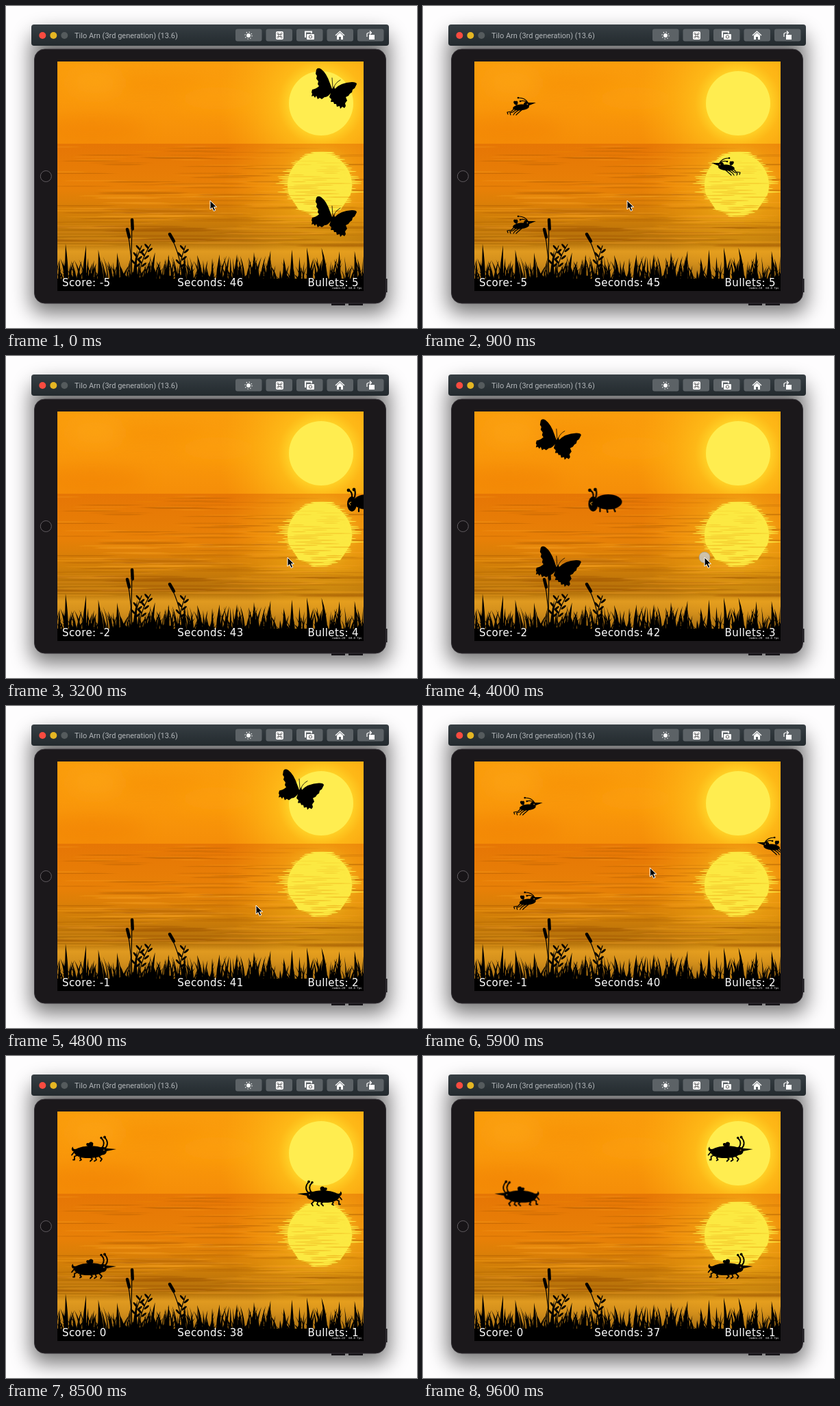
An HTML page for the animation above (9700 ms loop, 600 by 470 pixels).

```html
<!DOCTYPE html>
<html lang="en">
<head>
<meta charset="utf-8">
<title>Sunset shooter</title>
<style>
  html, body { margin: 0; width: 100%; height: 100%; overflow: hidden; background: #fefdfe; }
  svg { display: block; width: 600px; height: 470px; }
  .title { font: 11px Roboto, sans-serif; fill: #b3b7ba; }
  .hud { font: 15px "DejaVu Sans", sans-serif; letter-spacing: .4px; fill: #fff; }
  .stats { font: 4px "DejaVu Sans Mono", monospace; fill: #eee; white-space: pre; }
  .line { fill: none; stroke: #000; stroke-linecap: round; stroke-linejoin: round; }
</style>
</head>
<body>
<svg viewBox="0 0 600 470" xmlns="http://www.w3.org/2000/svg">
  <defs>
    <linearGradient id="bar" x2="0" y2="1">
      <stop stop-color="#363e43"/><stop offset="1" stop-color="#232a2e"/>
    </linearGradient>
    <linearGradient id="sky" x2="0" y2="1">
      <stop stop-color="#fa9d0d"/><stop offset=".6" stop-color="#f9960a"/><stop offset="1" stop-color="#f58e08"/>
    </linearGradient>
    <linearGradient id="sea" x2="0" y2="1">
      <stop stop-color="#e67605"/><stop offset=".3" stop-color="#e88007"/>
      <stop offset=".5" stop-color="#d07e08"/><stop offset=".62" stop-color="#b9730a"/>
      <stop offset=".68" stop-color="#b8750c"/><stop offset=".73" stop-color="#e09a20"/>
      <stop offset=".8" stop-color="#d4901c"/><stop offset="1" stop-color="#8c5a0c"/>
    </linearGradient>
    <radialGradient id="glow">
      <stop offset=".3" stop-color="#ffd328"/><stop offset=".42" stop-color="#ffc01a" stop-opacity=".8"/>
      <stop offset="1" stop-color="#ffae10" stop-opacity="0"/>
    </radialGradient>
    <filter id="haze" x="-50%" y="-50%" width="200%" height="200%"><feGaussianBlur stdDeviation="14"/></filter>
    <filter id="ripple" x="-20%" y="-20%" width="140%" height="140%"><feGaussianBlur stdDeviation="3 .6"/></filter>
    <filter id="shade" x="-20%" y="-20%" width="140%" height="150%"><feGaussianBlur stdDeviation="15"/></filter>
    <clipPath id="screen"><rect x="75" y="81" width="447" height="335"/></clipPath>
    <clipPath id="water"><rect x="75" y="201" width="447" height="215"/></clipPath>

    <g id="butterfly">
      <path d="M-2 1L-5-7Q-10-22-18-28Q-23-31-25-27L-26-21L-24-18L-25-14L-22-10L-23-6L-21-3Q-25 1-31 2L-32 6L-31 8L-32 12L-29 11L-27 14L-25 11L-23 16L-20 14L-17 16L-13 13Q-8 13-4 7L-6 13L-3 16L-4 20L0 20L1 23L4 23L5 27L9 26L10 30L13 27L16 29L18 26L17 22L20 18L18 13L22 11L24 8L27 6L28 2L31 0L34-6Q34-9 27-9Q10-8 2 1L1-3Z"/>
      <path class="line" d="M-1-1L-2-15M1-2Q3-8 10-12" stroke-width=".8"/>
    </g>
    <g id="gnat">
      <ellipse cy="1" rx="12" ry="4.4" transform="rotate(-6)"/>
      <circle cx="8" cy="-3" r="4"/>
      <path d="M9-6L22-6L10-1ZM-6-2C-13-4-11-10-8-8C-5-10-3-6-6-2Z"/>
      <path class="line" d="M9-6Q5-10-1-8M10-6Q6-13-3-13M-8 1L-14 7L-20 8L-19 11M-5 3L-12 8L-16 9L-15 12M-2 4L-9 9L-11 12M2 4L-5 10L-7 12" stroke-width="1.2"/>
      <circle cx="-1" cy="-8" r="1.2"/><circle cx="-4" cy="-13" r="1.3"/>
      <circle cx="9.500" cy="-3.500" r=".9" fill="#b97a16"/>
    </g>
    <g id="beetle">
      <path d="M-29 3C-33 2-33-3-30-4C-31-1-28 0-25-1C-16-6 4-7 13-2C18 5 12 11 0 12C-14 14-28 11-29 3Z"/>
      <circle cx="13" cy="2" r="6"/>
      <path d="M16-2L33-.5L16 3ZM-7-4C-13-6-11-11-7-9C-5-13 1-10-1-7C0-5-3-4-7-4Z"/>
      <path class="line" d="M12-2Q18-10 11-17M16-1Q24-9 16-18M-23 8L-28 10L-28 15L-30 15M-16 10L-20 12L-18 15L-20 16M-5 11L-2 14L-5 17M2 10L4 15L1 17M8 10L12 14L10 17M-28 3L-32 8" stroke-width="1.8"/>
      <circle cx="11" cy="-17" r="1.700"/><circle cx="16" cy="-18" r="1.900"/>
      <circle cx="15" cy="1" r="1" fill="#a86c14"/>
    </g>
    <g id="weevil">
      <ellipse cx="-4" cy="3" rx="20" ry="11"/>
      <ellipse cx="18" cy="6" rx="7" ry="11"/>
      <path class="line" d="M18-4Q17-12 23-14M14-4Q12-12 15-16M-12 12L-14 17M-2 13L-3 18M8 12L8 17" stroke-width="2.2"/>
      <circle cx="23" cy="-14" r="2.400"/><circle cx="15" cy="-15" r="2.400"/>
      <path d="M19 3L22 5L20 8" fill="none" stroke="#c78616" stroke-width="1.2"/>
    </g>
  </defs>

  <rect x="37" y="40" width="522" height="408" rx="16" opacity=".55" filter="url(#shade)"/>

  <rect x="37" y="27" width="522" height="31" rx="4" fill="url(#bar)"/>
  <circle cx="53.300" cy="43" r="5" fill="#fb4b40"/>
  <circle cx="69.300" cy="43" r="5" fill="#e5b623"/>
  <circle cx="85.300" cy="43" r="5" fill="#555b5d"/>
  <text class="title" x="100" y="46.800">Tilo Arn (3rd generation) (13.6)</text>
  <g id="buttons" fill="#5c6266"></g>
  <g fill="none" stroke="#fff" stroke-width="1.2">
    <circle cx="354" cy="43" r="2.300" fill="#fff"/>
    <circle cx="354" cy="43" r="5" stroke-dasharray="1.3 2.627"/>
    <rect x="394" y="37" width="11" height="12" rx="2" fill="#fff" stroke="none"/>
    <path d="M398 41.500H401V44.500H398ZM398 41.500V40A1.200 1.200 0 1 0 396.500 41.500H398M401 41.500H402.500A1.200 1.200 0 1 0 401 40V41.500M401 44.500V46A1.200 1.200 0 1 0 402.500 44.500H401M398 44.500H396.500A1.200 1.200 0 1 0 398 46V44.500" stroke="#555" stroke-width=".8"/>
    <path d="M437 46V37.500H446V40" stroke-width="2"/>
    <rect x="439" y="41" width="11" height="8" rx="1" fill="#fff" stroke="none"/>
    <circle cx="444.500" cy="45" r="2.200" stroke="#555" stroke-width="1"/>
    <path d="M481 43L487.500 37L494 43"/>
    <path d="M483 43L487.500 39L492 43V49H489V45H486V49H483Z" fill="#fff" stroke="none"/>
    <rect x="530" y="42" width="8" height="7" fill="#fff" stroke="none"/>
    <path d="M527 45V41Q527 39 530 39H533M531 36.500L533.500 39L531 41.500"/>
  </g>

  <path d="M553 398H556.500V418H553ZM475 433H495V437H475ZM500 433H521V437H500Z" fill="#171519"/>
  <rect x="41.500" y="63" width="513" height="371" rx="15" fill="#1b181b" stroke="#343036"/>
  <circle cx="58.300" cy="248.500" r="8" fill="#171417" stroke="#625d62"/>

  <g clip-path="url(#screen)">
    <rect x="75" y="81" width="447" height="120" fill="url(#sky)"/>
    <g filter="url(#haze)" opacity=".45">
      <ellipse cx="125" cy="180" rx="80" ry="16" fill="#ee7a05"/>
      <ellipse cx="210" cy="112" rx="80" ry="14" fill="#f58c06"/>
      <ellipse cx="130" cy="112" rx="40" ry="16" fill="#ffac1e"/>
      <ellipse cx="310" cy="135" rx="60" ry="16" fill="#ffa510"/>
    </g>
    <circle cx="460" cy="142" r="150" fill="url(#glow)"/>
    <circle cx="460" cy="142" r="47" fill="#ffed50"/>
    <g clip-path="url(#water)">
      <rect x="75" y="201" width="447" height="215" fill="url(#sea)"/>
      <circle cx="458" cy="258" r="140" fill="url(#glow)" opacity=".5"/>
      <g id="ripples" filter="url(#ripple)"></g>
      <g id="mirror" fill="#fce942"></g>
    </g>
    <path id="grass"/>
    <g id="reeds"></g>
    <g id="flyers"></g>
    <g id="splats" fill="#f5260b"></g>
    <text class="hud" id="score" x="82" y="408.500"></text>
    <text class="hud" id="seconds" x="298.500" y="408.500" text-anchor="middle"></text>
    <text class="hud" id="bullets" x="515" y="408.500" text-anchor="end"></text>
    <text class="stats" id="stats" x="519.500" y="413" text-anchor="end"></text>
  </g>
  <circle id="touch" r="8" fill="#c9c9c5" fill-opacity=".85" stroke="#94938c" stroke-width=".6"/>
  <path id="cursor" d="M0 0V13L3 10.300L5.200 15.300L7.700 14.200L5.500 9.300H9.500Z" stroke="#fff"/>
</svg>
<script>
const LOOP = 9700, STEP = 100, SPEED = 0.2915;
const $ = id => document.getElementById(id);

function add(parent, tag, attrs) {
  const el = document.createElementNS('http://www.w3.org/2000/svg', tag);
  for (const key in attrs) el.setAttribute(key, attrs[key]);
  return parent.appendChild(el);
}

let seed = 11;
function rnd(lo = 0, hi = 1) {
  seed = (seed * 16807) % 2147483647;
  return lo + (hi - lo) * seed / 2147483647;
}

function drawButtons() {
  for (let i = 0; i < 5; i++)
    add($('buttons'), 'rect', { x: 335 + i * 44.500, y: 33.500, width: 38.500, height: 18, rx: 3 });
}

// Ripples grow longer and thicker towards the shore
function drawWater() {
  for (let i = 0; i < 170; i++) {
    const depth = rnd();
    add($('ripples'), 'ellipse', {
      cx: rnd(75, 522), cy: 205 + depth * 148,
      rx: rnd(20, 45) + depth * 50, ry: .5 + depth * rnd(.3, 1.800),
      fill: i % 2 ? '#9c5205' : '#f9a424', opacity: rnd(.15, .4)
    });
  }
}

function drawMirror() {
  const cx = 458, cy = 259, r = 47;
  add($('mirror'), 'path', { d: `M${cx - 45} 275A${r} ${r} 0 1 1 ${cx + 45} 275L${cx + 30} 298H${cx - 30}Z` });
  for (let y = cy - r + 2; y < cy + r + 3; y += 2.500) {
    const half = Math.sqrt(Math.max(150, r * r - (y - cy) ** 2));
    const swell = 20 * Math.exp(-(((y - 262) / 20) ** 2));
    add($('mirror'), 'ellipse', { cx: cx + rnd(-3, 4), cy: y, rx: half + rnd(0, 4 + swell), ry: 1.300 });
    if (y > 225)
      add($('mirror'), 'ellipse', {
        cx: cx + rnd(-35, 35), cy: y, rx: rnd(8, 30), ry: .8, fill: '#e99d12', opacity: (y - 205) / 150
      });
  }
}

function drawGrass() {
  let d = 'M75 398H522V416H75Z';
  const blade = (x, tip, w, lean) => {
    const mid = (tip + 402) / 2;
    d += `M${x - w} 402Q${x - w / 2} ${mid} ${x + lean} ${tip}Q${x + w} ${mid} ${x + w} 402Z`;
  };
  for (let i = 0; i < 420; i++)
    blade(rnd(73, 524), 394 - 30 * rnd() ** 1.200, rnd(.8, 2), rnd(-9, 9));
  for (let x = 88; x < 522; x += 25) {
    const edge = Math.abs(x - 280) / 240;
    blade(x + rnd(-5, 5), 364 - edge * rnd(6, 22), 3, rnd(-6, 6));
  }
  $('grass').setAttribute('d', d);
}

// A stem from root to tip, carrying either a seed head or leaves on both sides
function reed(root, x, y, leafy) {
  const at = k => [root + (x - root) * k * k, 402 + (y - 402) * k];
  add($('reeds'), 'path', { class: 'line', d: `M${root} 402Q${root} ${(y + 402) / 2} ${x} ${y}`, 'stroke-width': 1.200 });
  if (!leafy) {
    const [bx, by] = at(.85);
    add($('reeds'), 'path', { class: 'line', d: `M${x} ${y}L${bx + 1} ${by}`, 'stroke-width': 4.500 });
    return;
  }
  for (let k = .45, side = 1; k < 1.050; k += .1, side = -side) {
    const [lx, ly] = at(k);
    add($('reeds'), 'ellipse', {
      rx: 4.500, ry: 1.500, transform: `translate(${lx + side * 4} ${ly}) rotate(${side > 0 ? -40 : 50})`
    });
  }
}

function drawReeds() {
  reed(184, 177, 326);
  reed(183, 184, 312);
  reed(257, 239, 333);
  reed(194, 211, 348, true);
  reed(186, 198, 350, true);
  reed(252, 262, 350, true);
}

// Each wave gives its x at one moment; rows list [y, direction, moment shot]
const waves = [
  { kind: 'butterfly', x: 478, at: 0, rows: [[120, 1], [307, 1]] },
  { kind: 'gnat', x: 347, at: 1600, rows: [[147, 1], [320, 1], [235, -1, 1700]] },
  { kind: 'weevil', x: 63, at: 3200, rows: [[210, -1.100]] },
  { kind: 'butterfly', x: 430, at: 4800, rows: [[121.500, 1], [307, 1, 4500]] },
  { kind: 'gnat', x: 415, at: 6800, rows: [[147, 1], [285, 1]] },
  { kind: 'gnat', x: 310, at: 6700, rows: [[205, -1, 6700]] },
  { kind: 'beetle', x: 128, at: 8500, rows: [[136.500, 1], [307.500, 1], [201.500, -1]] }
];
const MIRROR = 596;

const flyers = waves.flatMap(({ kind, x, at, rows }) => rows.map(([y, dir, shot = LOOP]) => ({
  y, dir, shot,
  el: add($('flyers'), 'use', { href: '#' + kind }),
  x: t => (dir > 0 ? x : MIRROR - x - 10) + dir * SPEED * (t - at)
})));

function makeSplat(flyer) {
  const el = add($('splats'), 'g', { transform: `translate(${flyer.x(flyer.shot) + 10} ${flyer.y})` });
  for (let i = 0; i < 9; i++)
    add(el, 'ellipse', { cx: i * 2.600 - 11, cy: i % 2 * 2 - 1, rx: 2.700, ry: i > 6 ? 1.500 : 2.500 });
  return { at: flyer.shot, el };
}
const splats = flyers.filter(f => f.shot < LOOP).map(makeSplat);

const shots = [{ at: 1700, gain: 3 }, { at: 3900, gain: 0 }, { at: 4500, gain: 1 }, { at: 6700, gain: 1 }];
const stops = [
  { from: 0, to: 900, x: 298, y: 284 },
  { from: 1500, to: 1900, x: 206, y: 225 },
  { from: 3000, to: 4000, x: 411, y: 294 },
  { from: 4400, to: 5200, x: 365, y: 291 },
  { from: 6400, to: 7500, x: 311, y: 203 }
];

const show = (el, on) => el.setAttribute('visibility', on ? 'visible' : 'hidden');
const move = (el, x, y, flip = 1) => el.setAttribute('transform', `translate(${x} ${y}) scale(${flip} 1)`);

function pointer(t) {
  const i = stops.findIndex(s => t < s.to);
  if (i < 0) return null;
  const b = stops[i], a = stops[i - 1] || b;
  const k = t < b.from ? (t - a.to) / (b.from - a.to) : 1;
  const ease = k * k * (3 - 2 * k);
  return [a.x + (b.x - a.x) * ease, a.y + (b.y - a.y) * ease];
}

function render(t) {
  for (const f of flyers) {
    const x = f.x(t);
    show(f.el, t < f.shot && x > 30 && x < 570);
    move(f.el, x, f.y, Math.sign(f.dir));
  }
  for (const s of splats) show(s.el, t >= s.at && t < s.at + 300);

  const pos = pointer(t);
  show($('cursor'), pos);
  show($('touch'), pos && shots.some(({ at }) => t >= at && t < at + 200));
  if (pos) {
    move($('cursor'), ...pos);
    move($('touch'), ...pos);
  }
  const fired = shots.filter(({ at }) => at <= t);
  $('score').textContent = 'Score: ' + fired.reduce((sum, { gain }) => sum + gain, -5);
  $('seconds').textContent = 'Seconds: ' + (46 - Math.floor((t + 300) / 1000));
  $('bullets').textContent = 'Bullets: ' + (5 - fired.length);
  $('stats').textContent = `nodes:${18 + Math.floor((t + 1100) / 2150)}  60.0 fps`;
}

drawButtons();
drawWater();
drawMirror();
drawGrass();
drawReeds();
const start = performance.now();
function tick() {
  const t = (performance.now() - start) % LOOP;
  render(Math.floor(t / STEP) * STEP);
  requestAnimationFrame(tick);
}
tick();
</script>
</body>
</html>
```
